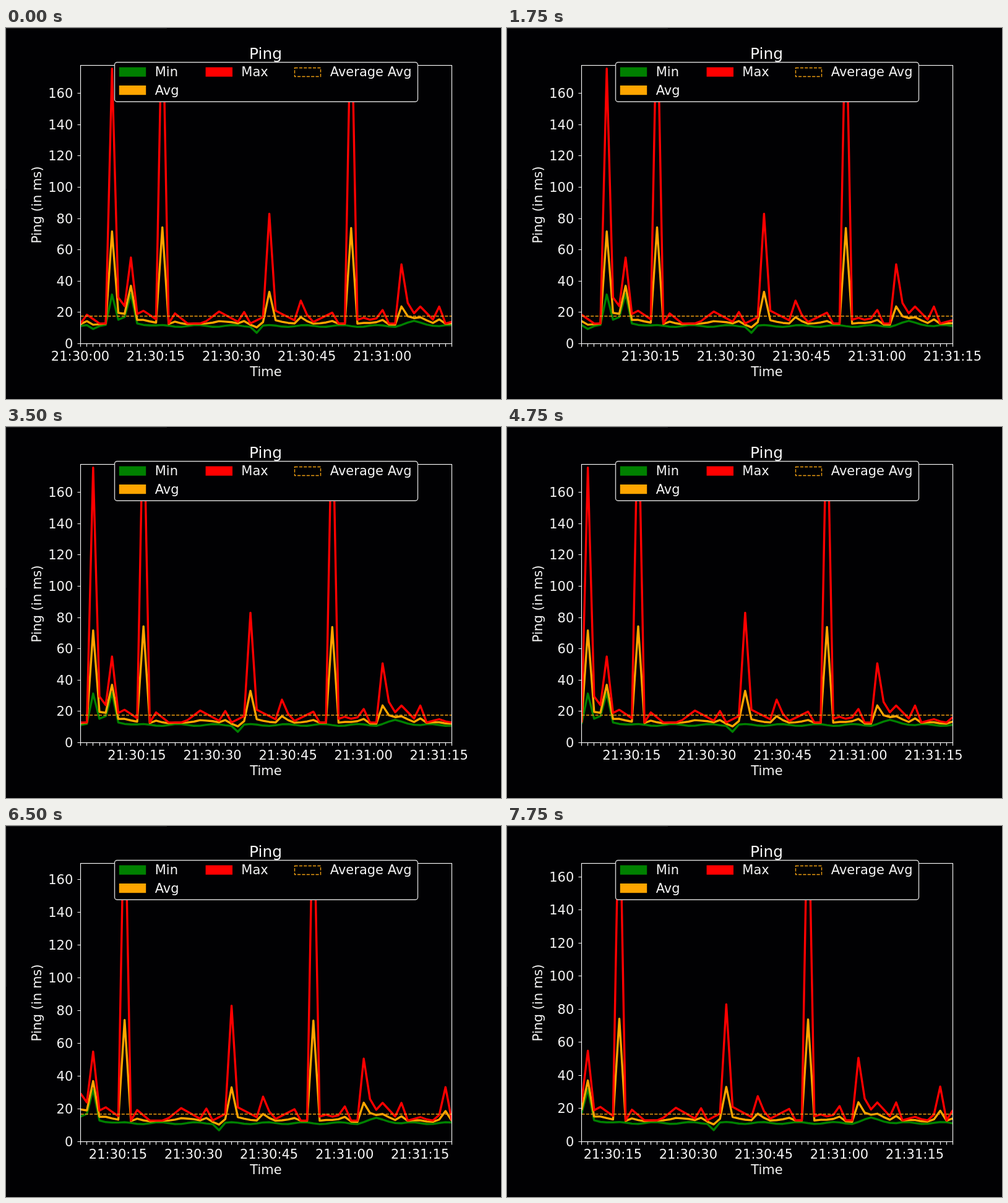
Write an HTML page that moves like this. It is 800 by 600 pixels and loops after 8 s.

```html
<!DOCTYPE html>
<html>
<head>
<meta charset="utf-8">
<title>Ping</title>
<style>
  html, body { margin: 0; width: 100%; height: 100%; overflow: hidden; background: #010103; }
  svg { display: block; font: 21px "DejaVu Sans", sans-serif; }
  text { fill: #f4f4f4; }
  .mid { text-anchor: middle; }
  .end { text-anchor: end; }
  .curve { fill: none; stroke-width: 3.4; stroke-linejoin: round; }
  .dash { fill: none; stroke: #ec9c10; stroke-width: 1.4; stroke-dasharray: 5.14 2.22; }
  .axis { fill: none; stroke: #f8f8f8; stroke-width: 1.15; }
</style>
</head>
<body>
<svg width="800" height="600" viewBox="0 0 800 600">
  <clipPath id="plot"><rect x="120.5" y="60.5" width="600" height="450"/></clipPath>
  <path d="M0 260V.5H260" fill="none" stroke="#242426"/>
  <g clip-path="url(#plot)">
    <path id="min" class="curve" stroke="#008000"/>
    <path id="avg" class="curve" stroke="#ffa500"/>
    <path id="max" class="curve" stroke="#ff0000"/>
    <path class="dash" d="M120.5 466H720.5"/>
  </g>
  <rect class="axis" x="120.5" y="60.5" width="600" height="450"/>
  <path id="ticks" class="axis"/>
  <g id="labels"></g>

  <text class="mid" x="419.5" y="50" font-size="25">Ping</text>
  <text class="mid" x="420" y="563">Time</text>
  <text class="mid" transform="translate(56.5 286) rotate(-90)">Ping (in ms)</text>

  <rect x="175.5" y="55.5" width="490" height="63.8" rx="4" fill="#010103" stroke="#d4d4d4" stroke-width="1.4"/>
  <rect x="182.8" y="63.5" width="43.4" height="15.2" fill="#008000"/>
  <rect x="182.8" y="93" width="43.4" height="15.2" fill="#ffa500"/>
  <rect x="322.6" y="63.5" width="43.4" height="15.2" fill="#ff0000"/>
  <rect class="dash" x="466.5" y="64.5" width="42" height="14"/>
  <text x="240.7" y="78.3">Min</text>
  <text x="240.7" y="107.8">Avg</text>
  <text x="380.3" y="78.3">Max</text>
  <text x="523.8" y="78.3">Average Avg</text>
</svg>
<script>
// Each bump: [index, peak value, reach to the left, reach to the right]
const maxBumps = [
  [1, 18.5, 1, 2], [5, 175.7], [6, 29.5, 1, 3], [8, 55], [10, 21, 4, 3], [13, 225], [15, 19.3, 1, 2],
  [22, 20.5, 2.5, 3.5], [26, 20.2], [29, 17, 2], [30, 83], [31, 21, 1, 4], [35, 27.5, 1, 1.6],
  [40, 19.8, 3.5], [43, 225], [45, 16.5, 3, 3], [48, 21.5, 1.6], [51, 50.7], [52, 26, 1, 2],
  [54, 23.7, 1.5, 2.6], [57, 23.7], [60, 15, 2, 1.5], [64, 33.3, 1.2], [66, 19]
];
const minBumps = [[2, 8.9], [5, 31.8], [7, 16.4, 4], [8, 31.5], [9, 13.2, 1, 3], [28, 7.3], [53, 14, 3, 4]];
const shiftAt = [750, 2000, 3000, 4000, 5000, 6500, 7500];
const LOOP = 8000, POINTS = 60, LABEL_EVERY = 12;
const el = id => document.getElementById(id);
const xOf = i => 120.5 + i * 600 / (POINTS - 1);

// A flat base with triangular bumps; the strongest one wins where they overlap
function bumpy(i, base, bumps) {
  const offsets = bumps.map(([at, peak, left = 1, right = 1]) => {
    const distance = i < at ? (at - i) / left : (i - at) / right;
    return (peak - base) * Math.max(0, 1 - distance);
  });
  return base + offsets.reduce((a, b) => Math.abs(b) > Math.abs(a) ? b : a);
}

const series = {
  min: i => bumpy(i, 11.3, minBumps) + .6 * Math.sin(1.1 * i),
  max: i => bumpy(i, 12.9, maxBumps),
  avg: i => 8.7 + .29 * series.max(i) + .6 * (series.min(i) - 11.3)
};

function timeLabel(n) {
  const seconds = n / LABEL_EVERY * 15;
  const pad = v => String(v).padStart(2, "0");
  return `21:${30 + Math.floor(seconds / 60)}:${pad(seconds % 60)}`;
}

function draw(shift) {
  const top = shift < 6 ? 177.8 : shift < 7 ? 169.9 : 168.2;
  const yOf = v => 510.5 - v * 450 / top;

  for (const name in series) {
    const points = Array.from({ length: POINTS }, (_, i) => `${xOf(i)} ${yOf(series[name](i + shift))}`);
    el(name).setAttribute("d", "M" + points.join("L"));
  }

  let ticks = "", labels = "";
  for (let i = 0; i < POINTS; i++) {
    ticks += `M${Math.floor(xOf(i)) + .5} 510.5v5`;
    const n = i + shift;
    if (n % LABEL_EVERY === 0)
      labels += `<text class="mid" x="${xOf(i) - .5}" y="538.3">${timeLabel(n)}</text>`;
  }
  for (let v = 0; v <= 160; v += 20) {
    const y = Math.floor(yOf(v)) + .5;
    ticks += `M120.5 ${y}h-5`;
    labels += `<text class="end" x="108.3" y="${y + 7.8}">${v}</text>`;
  }
  el("ticks").setAttribute("d", ticks);
  el("labels").innerHTML = labels;
}

let shown = -1;
function frame() {
  const t = performance.now() % LOOP;
  const shift = shiftAt.filter(s => t >= s).length;
  if (shift !== shown) draw(shown = shift);
  requestAnimationFrame(frame);
}
frame();
</script>
</body>
</html>
```
